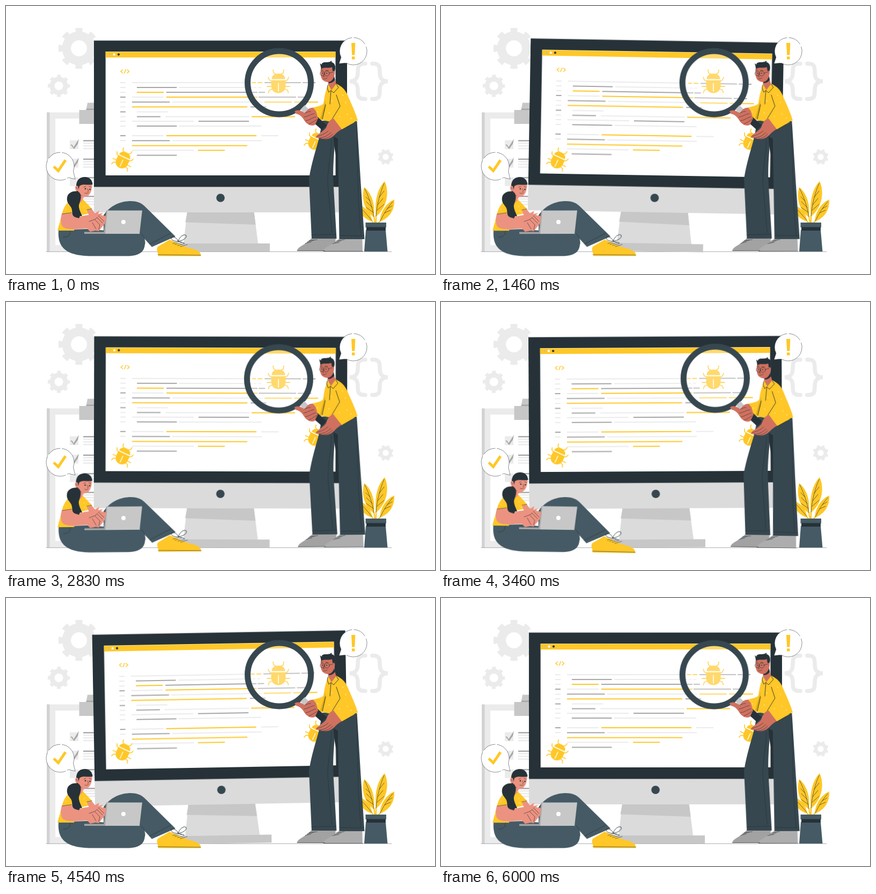
An HTML page for the animation above (6040 ms loop, 800 by 500 pixels).

```html
<!DOCTYPE html>
<html lang="en">
<head>
<meta charset="utf-8">
<title>Bug hunt</title>
<style>
  html, body { margin: 0; width: 100%; height: 100%; overflow: hidden; background: #fff; }
  svg { display: block; width: 100%; height: 100%; }

  .dark { fill: #263238; }
  .slate { fill: #37474f; }
  .denim { fill: #455a64; }
  .gold { fill: #ffc727; }
  .pale { fill: #ebebeb; }
  .grey { fill: #c7c7c7; }
  .skin { fill: #d0715f; }
  .blush { fill: #ec9280; }
  .line { fill: none; stroke: #263238; stroke-width: .9; stroke-linecap: round; stroke-linejoin: round; }
  .thin { stroke-width: .65; }
  .floor { stroke-width: .4; }
  .bubble { fill: #fff; stroke: #263238; stroke-width: .55; stroke-dasharray: 62 3 25 5; }
  .code path { fill: none; stroke-width: 2; }
  .gear circle { fill: none; stroke: #ebebeb; }
  .brace { fill: none; stroke: #ebebeb; stroke-width: 7.5; stroke-linecap: round; }
  .fleck { fill: none; stroke: #fff; stroke-width: .9; stroke-linecap: round; opacity: .8; }

  /* gentle sway: the screen slowly, the people four times as fast */
  .sway { animation: sway 1510ms linear infinite; }
  #monitor { transform-origin: 400px 261px; animation-duration: 6040ms; }
  #man { transform-origin: 557px 268px; }
  #girl { transform-origin: 230px 393px; }
  @keyframes sway {
    0%, 100% { transform: rotate(0deg); }
    25% { transform: rotate(1deg); }
    75% { transform: rotate(-1deg); }
  }
</style>
</head>
<body>
<svg viewBox="0 0 800 500">
  <defs>
    <g id="gear" class="gear">
      <circle r="23.2" stroke-width="16.5"/>
      <circle r="33.5" stroke-width="9.5" pathLength="16" stroke-dasharray=".95 1.05" stroke-dashoffset=".475"/>
    </g>
    <path id="brace" class="brace" d="M670 107.5C656 107 656 114 656 124C656 135 652 140 641 140.5C652 141 656 146 656 157C656 168 656 173.5 670 173.5"/>
    <g id="bug">
      <path class="gold" d="M-12.5 -6.5C-12.5 -13 -7.5 -17 0 -17S12.500 -13 12.500 -6.500ZM-13.5 -4.500H13.500V5C13.500 14 8 19.500 0 19.500S-13.500 14 -13.500 5Z"/>
      <path fill="none" stroke="#ffc727" stroke-width="1.800" stroke-linecap="round" stroke-linejoin="round"
        d="M-5 -16L-9 -18L-10 -23.500M5 -16L9 -18L10 -23.500M-13 -3L-17 -5L-19 -10M13 -3L17 -5L19 -10M-13 7H-21M13 7H21M-12 12L-17 14L-18.500 19M12 12L17 14L18.500 19"/>
      <path stroke="#fff" stroke-width="1.600" d="M0 1V16.500"/>
    </g>
    <g id="task">
      <path class="pale" d="M119 0h16v16.500h-16z"/>
      <path fill="none" stroke="#ebebeb" stroke-width="2.400" d="M144 5.500h24M144 10.500h24M144 15.500h24"/>
      <path fill="none" stroke="#a6a6a6" stroke-width="2.400" d="M144 .8h24"/>
    </g>
    <path id="tick" fill="#a6a6a6" d="M120 7L123.500 8L126 12.500L136 -3L134 6L127 16Z"/>
  </defs>

  <!-- backdrop -->
  <use href="#gear" transform="translate(136 79)"/>
  <use href="#gear" transform="translate(98.500 149) scale(.54)"/>
  <use href="#gear" transform="translate(708 281.500) rotate(22.500) scale(.385)"/>
  <use href="#brace"/>
  <use href="#brace" transform="matrix(-1 0 0 1 1353 0)"/>

  <!-- clipboard -->
  <path class="pale" d="M76 198.500H250V458H76Z"/>
  <path fill="#d2d2d2" d="M76 198.500h5.500V458H76Z"/>
  <path fill="#fff" d="M92 210H240V446H92Z"/>
  <path class="grey" d="M136.500 194H190V220H136.500ZM152 180.500H180V194H149.500Z"/>
  <path fill="#a6a6a6" d="M150 191.500h30v2.500h-30.500z"/>
  <use href="#task" y="250.500"/><use href="#tick" y="251"/>
  <use href="#task" y="285"/><use href="#tick" y="285.500"/>
  <use href="#task" y="319.500"/>
  <use href="#task" y="354.500"/>
  <path class="line floor" d="M75 458.400H719"/>

  <!-- monitor -->
  <g id="monitor" class="sway">
    <path class="grey" d="M308 443H492V458H308Z"/>
    <path fill="#dbdbdb" d="M338 384H462.500L470 443H331Z"/>
    <path class="grey" d="M338 384H462.500L465.500 408L334.500 403.500Z"/>
    <path fill="#dbdbdb" d="M164 337H636V385H164Z"/>
    <path class="dark" d="M164 64.500H636V337.500H164Z"/>
    <path fill="#fff" d="M185.700 85H614.500V316H185.700Z"/>
    <path class="gold" d="M185.700 85.500H614.500V96H185.700Z"/>
    <circle cx="194" cy="90.400" r="2" fill="#d8c078"/>
    <circle cx="201.700" cy="90.400" r="2.100" fill="#fff"/>
    <circle cx="210" cy="90.400" r="2.100" class="dark"/>
    <circle cx="400" cy="358" r="7.800" class="slate"/>
    <g class="code">
      <path stroke="#ffc727" style="stroke-width:1.5" d="M218 118.500L214 122L218 125.500M223.500 118L220.500 126M225.800 118.500L229.500 122L225.800 125.500"/>
      <path stroke="#ebebeb" d="M213 143h10m-10 9h10m-10 9h10m-10 18.500h10m-10 8.700h10m-10 18.300h10m-10 8.500h10m-10 9h10m-10 27h10
        M235 143H456M323 152H460M462 152h5M470 152h6M235 170H294M310 179.300H478M244 197.500H302M297 206.500H454M235 215H350M323 224H476M235 242H294M476 242H508M310 251.200H477M235 269.300H350"/>
      <path stroke="#a6a6a6" d="M213 170h10m-10 27.500h10m-10 44.500h10
        M482 143H550M553 143H577M244 152H318.500M299 161H469M471 161H483M471 170H541M544 170H569M235 179.300H305.500M456 188.200H485M244 206.500H288M359 215H453M244 224H318.500M235 251.200H305.500M244 278.500H318.500"/>
      <path stroke="#ffc727" d="M459 143h7M469 143h9M244 161H294M299 170H469M482 179.300H533M537 179.300H582M235 188.200H450M458 206.500H539M299 242H467M235 260.500H450M358 269.300H408"/>
    </g>
  </g>

  <use href="#bug" transform="translate(508 143)"/>
  <use href="#bug" transform="translate(218.500 286.500) rotate(25) scale(.87)"/>
  <use href="#bug" transform="translate(577.500 251.500) rotate(25) scale(.87)"/>

  <!-- speech bubbles -->
  <path class="bubble" d="M621 107.500L624.800 95.800A25.500 25.500 0 1 1 634.500 106.300Z"/>
  <path class="gold" d="M644 69L651.300 68.800L650.400 91.500H645.200ZM645 94.200H650.500V99.500H645Z"/>
  <path class="bubble" d="M129 323L125.500 308A26 26 0 1 0 116.500 320Z"/>
  <path fill="none" stroke="#ffc727" stroke-width="5" d="M89 299.500L97.500 307.500L111 287.500"/>

  <!-- plant -->
  <g>
    <path class="gold" d="M690 393C687 365 692 342 706 327C715 345 712 375 690 393ZM686 394C671 384 661 362 668 338C682 349 689 370 686 394ZM683 402C670 399 659 388 655 370C670 374 681 386 683 402ZM697 402.500C698 385 708 368 724 361C725 380 716 395 697 402.500Z"/>
    <path fill="none" stroke="#ffc727" stroke-width="2.400" d="M690 391V405M686 392L688 405M682 400L685 405M698 401L694 405"/>
    <path class="line thin" d="M690 392C692 370 697 350 705 331M686 393C683 374 676 355 669 341M682 400C674 390 666 381 658 373M698 401C704 388 712 376 721 365M693 371L703 359M696 357L705 345M692 381L705 370M683 376L672 365M679 364L671 356M685 385L672 376M706 386L717 381M711 378L720 373"/>
    <path class="denim" d="M670.500 404H709V413H670.500ZM671 418H708L711.500 458H668Z"/>
    <path class="dark" d="M672 412.500H708V419H672Z"/>
  </g>

  <!-- man with magnifier -->
  <g id="man" class="sway">
    <path fill="#a3a2a2" d="M543 456C544 449 558 446 570 433H615L614 444L596 457H544Z"/>
    <path fill="#aeadad" d="M592 456C597 447 612 445 621 434H664.500L665 457.500H593Z"/>
    <path class="line thin" d="M543 456.500H594M592 457.500H665M562 440L574 437M565 437.500L580 436M613 441L625 438M616 438L631 436M558 443L569 440M609 443.500L621 441"/>
    <path class="slate" d="M618 215H654.500L661.500 330L668.500 435H621.500L619.500 290Z"/>
    <path class="slate" d="M590 214H634L619 262L613 258C611 285 609.500 305 610.500 330L616.500 434H570L565 322C570 292 578 268 584 246Z"/>
    <path class="dark" d="M611 243L619 248V294C615 280 611 262 611 243Z"/>
    <path class="line thin" d="M607 250C605 285 599 310 600 332L608 423M570 427L615 426M654 224C656 290 655 360 662 428M623 428L667 429"/>

    <path class="gold" d="M601 148L616 145C627 150 633 157 637 166C644 183 651 196 656 214L628 220L590 213L573 211L571 190C580 187 587 187 592 182C594 169 596 157 601 148Z"/>
    <path fill="#dba91c" d="M596 176L595 194L589 211L586 210C589 200 592 188 596 176Z"/>
    <path class="gold" d="M616 158C628 170 640 184 652 203C656 209 654 214 648 218L626 231L609 211L623 188Z"/>
    <path class="line" d="M616 166L623 187L608.500 210.500L626 231L644 221M590 211L596 184"/>
    <path class="fleck" d="M607 176l2 2M627 166l2 1M634 179l-1 2M602 199l2 1M621 207l2 -1M636 201l1 2M645 209l-2 1M580 197l2 1"/>

    <path class="skin" d="M588 112C586 120 586 130 589 136C592 141 599 142 601 142L600 149L607 158L616 147L612 133L614 112Z"/>
    <path class="dark" d="M601 142C607 141 610 137 612 131L613.500 138C611 141 607 144 602 144Z"/>
    <path class="dark" d="M588 118L585.500 107L589 109.500C588 106 592 104.500 598 105L604 104.200L607 102L607.500 105C612 106 614.500 110 614 117L612 125L609 121L608 114C601 117 591 113 588 118Z"/>
    <path class="skin" d="M608 122C612 119 615 123 612 129L608 129Z"/>
    <g class="line thin">
      <circle cx="590" cy="126" r="4.200"/><circle cx="598.300" cy="126" r="4.700"/>
      <path d="M603 125L610 123M593 127L592 132L594 132M592 136Q596 137 599 134M587 120L591 119M596 120L601 120.500"/>
    </g>
    <circle cx="590.500" cy="125.500" r="1" class="dark"/><circle cx="598" cy="125.500" r="1" class="dark"/>
    <path class="gold" d="M601 146L607 157L616 145L620 152L610 162L606 158L602 162L599 153Z"/>
    <path class="line" d="M600 148L599 153L602 161L606 157.500L611 162L620 152L616 146M606 158L604 183"/>

    <circle cx="509.500" cy="143" r="55" fill="#fff" opacity=".32"/>
    <circle cx="509.500" cy="143" r="59" fill="none" stroke="#37474f" stroke-width="11"/>
    <path stroke="#c7c7c7" stroke-width="11" d="M553 189L574 210"/>
    <path stroke="#263238" stroke-width="13" d="M568 204L594 227"/>
    <path class="skin" d="M538 197C543 192 551 195 557 200C562 193 567 189 573 190L578 196L582 210L576 222C568 225 560 220 556 213C551 204 545 202 541 201Z"/>
    <path class="line thin" d="M557 200C561 199 564 196 568 197M556 207C564 206 569 201 575 201M559 214C567 213 573 207 578 207M565 220C572 218 576 213 580 212"/>
    <path class="skin" d="M577 246C582 237 591 235 597 227C600 218 604 211 611 210L626 230C615 235 611 246 600 248C590 250 584 245 577 246Z"/>
    <path class="line thin" d="M579 243C587 242 594 239 601 233M584 246C593 246 600 242 606 236M592 248C599 247 605 244 609 239"/>
  </g>

  <!-- girl with laptop -->
  <g id="girl" class="sway">
    <path class="denim" d="M182 390C195 372 213 364 233 364C243 364 252 367 258 373L316 430L272 449.500L249 424L182 425Z"/>
    <path class="denim" d="M98 418C96 446 106 466.500 160 466.500H225C247 466.500 259 460 259 442C259 432 254 425 246 424L150 416Z"/>
    <path class="line thin" d="M107 431C116 432 121 426 120 418M250 424C256 427 260 434 259 444M268 444L307 424"/>
    <path class="gold" d="M283 449L305 436C318 441 329 448 344 452C358 455 364 460 363.500 466.500H284C284 459 279 455 283 449Z"/>
    <path class="line thin" d="M283 464L363 465M311 443L322 440M315 445L328 441M320 447L333 443M325 449L338 445"/>
    <path class="line" d="M321 439C311 440 304 433 310 431C315 430 320 435 321 439C323 431 332 424 336 428C338 433 329 438 321 439L332 442"/>

    <path class="gold" d="M131 357L141 358L160 378L155 387L133 392L127 419H96L106 382C111 369 119 360 131 357Z"/>
    <path class="blush" d="M132 343L150 350L143 360C142 370 128 369 128 358Z"/>
    <path class="fleck" stroke-linecap="round" d="M116 371h1M111 379h1M145 374h1M149 384h1M101 403h1M112 414h1M146 382h1"/>
    <path class="blush" d="M151 381L160 379L167 388L156 394Z"/>
    <path class="blush" d="M104 388L122 386C128 392 134 395 146 391L161 389L174 382L172 388L181 386L177 390L187 392L185 405L173 420L167 419L157 421L151 415C132 416 112 419 105 411C101 405 102 395 104 388Z"/>
    <path class="line thin" d="M104.500 388L122 385.500M151 380L160 378.500M155 402L166 398L174 391M166 399L175 408L173 417M161 404L168 416"/>

    <path class="blush" d="M133 329C131 338 132 347 136 352C142 358 152 357 156 351C160 345 161 337 160 330Z"/>
    <path class="dark" d="M131 334C132 324 138 319 147 319C155 319 161 324 161.500 333C153 335 143 331 137 336L134 347L131 344Z"/>
    <path class="dark" d="M134 346C125 344 115 349 114 357C112 367 120 372 122 377C125 384 121 390 129 394L136 396L138 392L142 392C139 384 135 378 136 371C139 362 142 355 137 348Z"/>
    <path class="blush" d="M134 336C129 333 127 340 131 345L136 345Z"/>
    <path class="line thin" d="M131 338L133 342M145 338Q147 336 149 337M155 336.500L159 338M152 341L154 345L152 346M147 349Q151 351 154 348M136 349L141 354"/>
    <circle cx="148" cy="341" r="1.300" class="dark"/><circle cx="156.500" cy="342" r="1.300" class="dark"/>

    <path fill="#a6a6a6" d="M146 421.500H184L185 425H146ZM187 381.500H191L187 425H182Z"/>
    <path class="grey" d="M189 381.500H254L249 425H185Z"/>
    <circle cx="219" cy="403" r="4" fill="#fff"/>
    <path class="blush" d="M169 393L187 392L185 403L181 405Z"/>
    <path class="line thin" d="M170 395L180 405M174 393L183 402"/>
  </g>
</svg>
</body>
</html>
```
